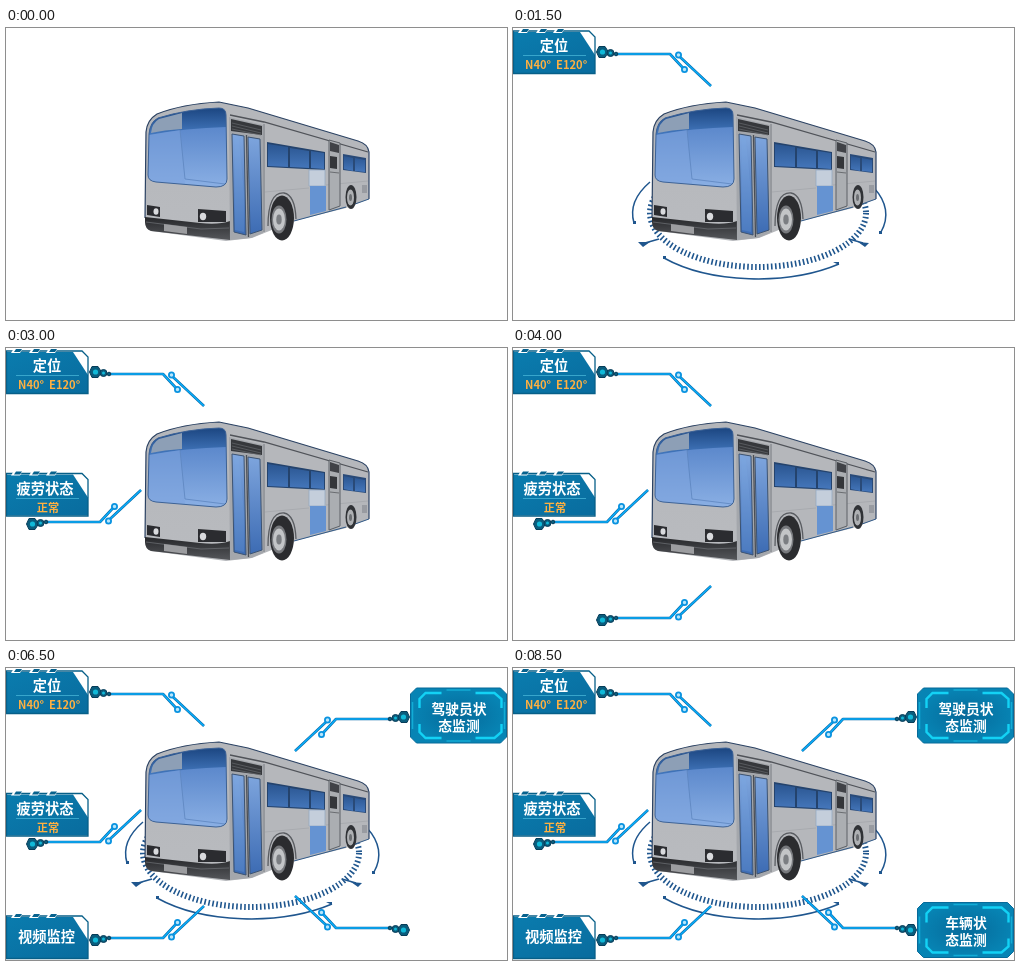
Animation of 501 by 292 pixels, one loop 9 s. Source, as an HTML page:

```html
<!DOCTYPE html>
<html lang="zh-CN">
<head>
<meta charset="utf-8">
<style>
html, body { margin: 0; width: 100%; height: 100%; overflow: hidden; background: #fff; }
svg { display: block; width: 501px; height: 292px; }
text { font-family: "Noto Sans CJK SC", "Noto Sans CJK", sans-serif; font-weight: 700; text-anchor: middle; fill: #fff; }
.title { font-size: 14.3px; }
.wide { font-size: 13.8px; }
.value { font-size: 11.2px; fill: #ffb040; }
.left { text-anchor: start; }
.ring { animation: blink 1s step-end infinite; }
.step { animation: 9s step-end infinite; }
.line1 { animation-name: at1000; }
.panel1 { animation-name: at1500; }
.line2 { animation-name: at2500; }
.panel2 { animation-name: at3000; }
.line3 { animation-name: at4000; }
.panel3 { animation-name: at4500; }
.line4 { animation-name: at5500; }
.panel4 { animation-name: at6000; }
.line5 { animation-name: at6500; }
.panel5 { animation-name: at7000; }
@keyframes blink { 0% { visibility: hidden } 50%, 100% { visibility: visible } }
@keyframes at1000 { 0% { visibility: hidden } 11.111%, 100% { visibility: visible } }
@keyframes at1500 { 0% { visibility: hidden } 16.666%, 100% { visibility: visible } }
@keyframes at2500 { 0% { visibility: hidden } 27.777%, 100% { visibility: visible } }
@keyframes at3000 { 0% { visibility: hidden } 33.333%, 100% { visibility: visible } }
@keyframes at4000 { 0% { visibility: hidden } 44.444%, 100% { visibility: visible } }
@keyframes at4500 { 0% { visibility: hidden } 50%, 100% { visibility: visible } }
@keyframes at5500 { 0% { visibility: hidden } 61.111%, 100% { visibility: visible } }
@keyframes at6000 { 0% { visibility: hidden } 66.666%, 100% { visibility: visible } }
@keyframes at6500 { 0% { visibility: hidden } 72.222%, 100% { visibility: visible } }
@keyframes at7000 { 0% { visibility: hidden } 77.777%, 100% { visibility: visible } }
</style>
</head>
<body>
<svg viewBox="0 0 501 292">
  <defs>
    <linearGradient id="glass" x1="0" y1="0" x2="0" y2="1">
      <stop offset="0" stop-color="#4d7cc4"/><stop offset="1" stop-color="#8aafe4"/>
    </linearGradient>
    <linearGradient id="sign" x1="0" y1="0" x2="0" y2="1">
      <stop offset="0" stop-color="#1c4681"/><stop offset="1" stop-color="#4479bf"/>
    </linearGradient>
    <linearGradient id="door" x1="0" y1="0" x2="0" y2="1">
      <stop offset="0" stop-color="#7fa6de"/><stop offset="1" stop-color="#3c6bb3"/>
    </linearGradient>
    <linearGradient id="front" x1="0" y1="0" x2="0" y2="1">
      <stop offset="0" stop-color="#b4b6ba"/><stop offset="1" stop-color="#b9bbbf"/>
    </linearGradient>
    <linearGradient id="bumper" x1="0" y1="0" x2="0" y2="1">
      <stop offset="0" stop-color="#26272a"/><stop offset="1" stop-color="#55575b"/>
    </linearGradient>
    <linearGradient id="window" x1="0" y1="0" x2="0" y2="1">
      <stop offset="0" stop-color="#2a5590"/><stop offset="1" stop-color="#4577bb"/>
    </linearGradient>
    <linearGradient id="card" x1="0" y1="0" x2="1" y2="1">
      <stop offset="0" stop-color="#0a7cae"/><stop offset="1" stop-color="#096c9e"/>
    </linearGradient>
    <radialGradient id="wideCard">
      <stop offset="0" stop-color="#066a9a"/><stop offset="1" stop-color="#0784b4"/>
    </radialGradient>

    <g id="connector">
      <g fill="none" stroke-linejoin="round">
        <path d="M103 26H157L170 40M167 29L198 58" stroke="#0b6aa8" stroke-width="2.6"/>
        <path d="M103 26H157L170 40M167 29L198 58" stroke="#08adfa" stroke-width="1.6"/>
        <g fill="#b9e6fb" stroke="#0a93e0" stroke-width="1.8">
          <circle cx="171.500" cy="41.500" r="2.600"/><circle cx="165.500" cy="27" r="2.600"/>
        </g>
      </g>
      <g fill="#0a5d7d" stroke="#083d59">
        <path d="M86 18.500H92L95.500 24L92 29.500H86L83.500 24Z"/>
        <circle cx="97.500" cy="25" r="3.500"/><circle cx="103" cy="26" r="1.800"/>
      </g>
      <g fill="#10b9d8"><circle cx="89.500" cy="24" r="2.600"/><circle cx="97.500" cy="25" r="1.500"/></g>
    </g>

    <g id="smallPanel">
      <path d="M0 4H67L82 27V45H0Z" fill="url(#card)"/>
      <path d="M0 3H76L82 9V45.500H0M.5 3V45" fill="none" stroke="#075f88" stroke-width="1.300"/>
      <path d="M8 0h9l-3 5h-9zM26 0h9l-3 5h-9zM43 0h9l-3 5h-9z" fill="#fff"/>
      <path d="M10 1h6l-2 3h-6zM28 1h6l-2 3h-6zM45 1h6l-2 3h-6z" fill="#07628e"/>
    </g>

    <g id="widePanel">
      <path d="M6 0H90L96 6V49L90 55H6L0 49V6Z" fill="url(#wideCard)" stroke="#076a99"/>
      <path d="M9 20V11L15 5H31M65 5H84L91 11V20M91 36V44L84 50H65M31 50H15L9 44V36" fill="none" stroke="#13d2f5" stroke-width="2.400"/>
      <path d="M2 14V41M94 14V41M36 2H60M36 53H60" stroke="#12acd5" stroke-width="1.500"/>
    </g>
  </defs>

  <g class="ring" fill="none" stroke="#1f568e">
    <ellipse cx="245" cy="185" rx="108" ry="54" stroke-width="6" stroke-dasharray="1.600 2.400"/>
    <g stroke-width="1.500">
      <path d="M137 154A126 63 0 0 0 121 195"/>
      <path d="M361 160A126 63 0 0 1 368 204"/>
      <path d="M151 230A126 63 0 0 0 326 236"/>
      <path d="M132 215L146 211M336 211L350 215"/>
    </g>
    <path d="M125 214L137 214L130 219ZM356 215L345 214L352 219ZM320 234h6v3zM366 203h3v3h-3zM120 193h3v3h-3zM150 228h3v3h-3z" fill="#1f568e" stroke="none"/>
  </g>

  <g id="bus">
    <path d="M140 104Q141 92 151 86Q176 76 213 74L242 80L352 113Q362 116 363 124V171L340 180L288 193L246 210L220 213L145 203Q139 201 139 190Z" fill="#b5b7bb"/>
    <path d="M140 104Q141 92 151 86Q176 76 213 74L221 82L224 210L139 193Z" fill="url(#front)"/>
    <path d="M139 190L140 104Q141 92 151 86Q176 76 213 74L242 80L352 113Q362 116 363 124V171" fill="none" stroke="#2b4263" stroke-width="1.200"/>
    <path d="M224 87L258 94L362 124" fill="none" stroke="#505359" stroke-width="1.300"/>

    <path d="M143 106Q144 94 152 90Q181 81 213 80Q220 80 220 87L221 151Q221 159 210 159L150 154Q142 153 142 147Z" fill="url(#glass)"/>
    <path d="M143 106Q144 94 152 90Q181 81 213 80Q220 80 220 87V99Q180 100 143 107Z" fill="url(#sign)"/>
    <path d="M145 105Q146 95 153 91L176 85V101Q158 102 145 105Z" fill="#8d9fb6"/>
    <path d="M143 107L174 102L179 156L150 154Q142 153 142 147Z" fill="#7ea5df" opacity=".55"/>
    <path d="M174 102L179 151L219 156" fill="none" stroke="#5d86bf" stroke-width=".8"/>
    <path d="M143 106Q144 94 152 90Q181 81 213 80Q220 80 220 87L221 151Q221 159 210 159L150 154Q142 153 142 147Z" fill="none" stroke="#3d6295"/>

    <path d="M139 189L194 195Q213 197 224 193V212L145 203Q139 201 139 194Z" fill="url(#bumper)"/>
    <path d="M140 194L195 201L223 200" fill="none" stroke="#696b70" stroke-width=".8"/>
    <path d="M158 196L181 199V206L158 203Z" fill="#9c9da0"/>
    <path d="M141 177L154 179V189L141 187ZM192 181L220 183V194H192Z" fill="#2b2c30"/>
    <ellipse cx="150" cy="183.500" rx="2.500" ry="3.300" fill="#d9dadd"/>
    <ellipse cx="197" cy="188.500" rx="3.200" ry="3.700" fill="#d9dadd"/>

    <path d="M223 89L257 97V205L245 210L224 212Z" fill="#a4a7ac"/>
    <path d="M225 91L256 98V107L225 103Z" fill="#36383c"/>
    <path d="M226 95L255 102M226 98L255 105M226 101L255 107" stroke="#66696e" stroke-width=".7"/>
    <path d="M226 106L238 108L240 207L228 204ZM242 109L254 111L256 202L244 206Z" fill="url(#door)" stroke="#3c5372"/>
    <path d="M240.500 107L242.500 209" stroke="#4a4e55" stroke-width="1.300"/>
    <path d="M228 109L233 110L238 164V204L229 202Z" fill="#79a7e3" opacity=".25"/>
    <path d="M258 96V204" stroke="#777b80"/>

    <path d="M261 114L319 124V142L261 139Z" fill="#24436d"/>
    <path d="M262 116L282 119V139L262 138ZM284 120L303 123V140L284 139ZM305 123L318 125V141L305 140Z" fill="url(#window)"/>
    <path d="M303 142H319V158H303Z" fill="#c4cedb" stroke="#91a6c2" stroke-width=".7"/>
    <path d="M304 158H320V183L304 187Z" fill="#6593d2"/>
    <path d="M259 164L303 160M320 157L362 153" stroke="#a2a5aa" stroke-width=".7"/>

    <path d="M323 112L334 115V178L323 182Z" fill="#abaeb2" stroke="#5c6066"/>
    <path d="M324 114L333 117V125L324 123Z" fill="#404247"/>
    <path d="M324 128L331 129V141L324 140Z" fill="#34363a"/>
    <path d="M324 144L333 145" stroke="#6a6d71"/>
    <path d="M337 126L360 130V145L337 142Z" fill="#294a78"/>
    <path d="M338 128L347 130V143L338 141ZM349 130L359 132V144L349 143Z" fill="url(#window)"/>
    <path d="M356 157H361V165H356Z" fill="#989ba1"/>
    <path d="M288 193L340 179M349 176L363 171" stroke="#315987"/>

    <path d="M262 198Q262 164 278 165Q289 167 290 191" fill="none" stroke="#595c61" stroke-width="1.300"/>
    <ellipse cx="276" cy="190" rx="12" ry="22.500" fill="#2b2c2f"/>
    <ellipse cx="273" cy="191.500" rx="7.500" ry="14" fill="#77797d"/>
    <ellipse cx="273" cy="191.500" rx="6" ry="11" fill="#c3c5c7"/>
    <ellipse cx="273" cy="191.500" rx="2.700" ry="5" fill="#7b7e82"/>
    <ellipse cx="345" cy="169" rx="5.500" ry="12" fill="#303236"/>
    <ellipse cx="344.500" cy="169.500" rx="3.500" ry="8" fill="#aeb0b3"/>
    <ellipse cx="344.500" cy="169.500" rx="1.500" ry="3.500" fill="#6b6e72"/>
  </g>

  <use class="step line1" href="#connector"/>
  <use class="step line2" href="#connector" transform="translate(-63 200) scale(1 -1)"/>
  <use class="step line3" href="#connector" transform="translate(0 296) scale(1 -1)"/>
  <use class="step line4" href="#connector" transform="translate(487 25) scale(-1 1)"/>
  <use class="step line5" href="#connector" transform="translate(487 286) scale(-1 -1)"/>

  <g class="step panel1">
    <use href="#smallPanel"/>
    <text class="title" x="41" y="23">定位</text>
    <path d="M10 27.500H73" stroke="#45b3d6" stroke-width=".8"/>
    <text class="value left" x="12" y="40.500">N40°</text>
    <text class="value left" x="43" y="40.500">E120°</text>
  </g>
  <g class="step panel2">
    <use href="#smallPanel" y="122.500"/>
    <text class="title" x="39" y="145.500">疲劳状态</text>
    <path d="M10 150.500H73" stroke="#45b3d6" stroke-width=".8"/>
    <text class="value" x="42" y="163.500">正常</text>
  </g>
  <g class="step panel3">
    <use href="#smallPanel" y="245"/>
    <text class="title" x="40.500" y="273.500">视频监控</text>
  </g>
  <g class="step panel4">
    <use href="#widePanel" x="404.500" y="20"/>
    <text class="wide" x="453" y="46">驾驶员状</text>
    <text class="wide" x="453" y="62.500">态监测</text>
  </g>
  <g class="step panel5">
    <use href="#widePanel" x="404.500" y="234.500"/>
    <text class="wide" x="453" y="260">车辆状</text>
    <text class="wide" x="453" y="276.500">态监测</text>
  </g>
</svg>
</body>
</html>
```
